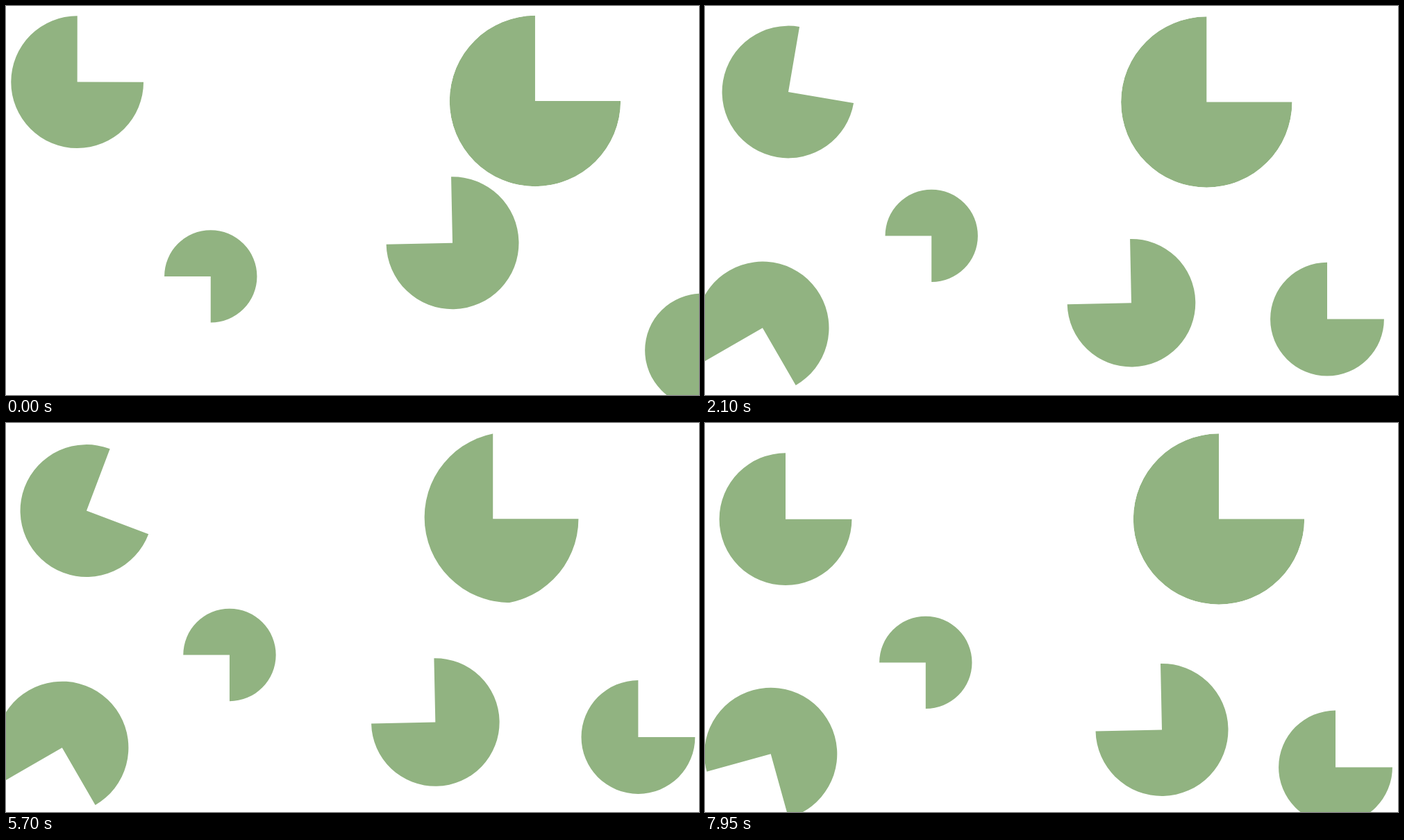
An HTML page for the animation above (8 s loop, 998 px wide and 561 px high).

```html
<!DOCTYPE html>
<html lang="en">
<head>
<meta charset="utf-8">
<title>Drifting pies</title>
<style>
html, body { margin: 0; width: 100%; height: 100%; overflow: hidden; background: #fff; }
svg { display: block; width: 100%; height: 100%; }
</style>
</head>
<body>
<svg viewBox="0 0 998 561" fill="#91b381">
  <defs><clipPath id="lens"><circle r="123.2"/></clipPath></defs>
</svg>
<script>
const LOOP = 8000;
const svg = document.querySelector('svg');
const lens = document.querySelector('#lens circle');

// rest is [x, y, radius, start angle of the missing quarter];
// every other pose is an offset from rest, with missing entries zero
const pies = [
  { rest: [120, 124, 95.4, -80.3], start: [-17.5, -14.5, 0, -6.8], early: [0, 0, 0, -2.9],
    out: [-4, 2.5, 0, 10.9], home: [-4, 14.7, 0, -9.7], enter: [127.3, -46.4] },
  { rest: [707.3, 138.5, 123.2, -90], start: [64, -1.5],
    out: [6, -0.3], home: [32.7, 0], enter: [99.4, -54.9], sway: 15 },
  { rest: [326.2, 331.4, 66.7, 90], start: [-31.7, 59],
    out: [-4.2, 3], home: [-8.4, 14], enter: [-135.4, 86.6, 4.8, -4.8] },
  { rest: [614, 428.2, 92.3, 178.8], start: [29.3, -87.2, 7.5], early: [0, 0, -4.3],
    out: [4.3, 3.3], home: [44, 14.2, 3.2], enter: [70.3, 64.6] },
  { rest: [896, 451.6, 81.9, -90], start: [150.9, 45.4], early: [-43.6],
    out: [14.3, 1.4], home: [12, 44.9], enter: [60.2, -6.5] },
  { rest: [82.9, 464.2, 95.6, 60], start: [-153, 0, 0, -25], early: [-65, 6.8, 27.4, -65],
    out: [-2.1, 4], home: [11.8, 13.1, 0, 14.5], enter: [-25.7, 78.3, -4.6, -9.5] }
];
const big = pies[1];

function add(tag) {
  const el = document.createElementNS('http://www.w3.org/2000/svg', tag);
  svg.appendChild(el);
  return el;
}
for (const pie of pies) pie.el = add('path');
big.el.setAttribute('clip-path', 'url(#lens)');
const discs = [add('circle'), add('circle')];

const progress = (t, from, to) => Math.min(1, Math.max(0, (t - from) / (to - from)));
const smooth = u => u * u * (3 - 2 * u);
const shift = (pose, by = [], k) => pose.map((v, i) => v + k * (by[i] || 0));

function poseAt(pie, t) {
  if (t >= 7100) {
    const far = ((1 - progress(t, 7100, 7900)) / 0.6875) ** 4;
    return shift(shift(pie.rest, pie.home, 1), pie.enter, far);
  }
  let pose = shift(pie.rest, pie.start, Math.exp(-t / 120));
  pose = shift(pose, pie.early, 1 - smooth(progress(t, 650, 2050)));
  pose = shift(pose, pie.out, (Math.max(0, t - 5150) / 550) ** 5);
  return shift(pose, [pie.sway], Math.sin(2 * Math.PI * (t - 600) / 6000));
}

function sector([x, y, r, a]) {
  const at = deg => {
    const q = deg * Math.PI / 180;
    return (x + r * Math.cos(q)).toFixed(2) + ' ' + (y + r * Math.sin(q)).toFixed(2);
  };
  return `M${x} ${y}L${at(a + 90)}A${r} ${r} 0 1 1 ${at(a)}Z`;
}

function circle(el, x, y) {
  el.setAttribute('cx', x);
  el.setAttribute('cy', y);
}

function draw(t) {
  const empty = t >= 6500 && t < 7100;
  for (const pie of pies) {
    let pose = poseAt(pie, t);
    if (pie === big) {
      // the big pie jumps aside for a while, then comes back partly covered
      if (t >= 3450 && t < 5500) pose = [931, 228, 123.2, 173.4];
      const cover = Math.sin(Math.PI * progress(t, 5500, 5900)) ** 2;
      circle(lens, pose[0] + 24.6 * cover, pose[1] - 2.2 * cover);
    }
    pie.el.setAttribute('d', empty ? '' : sector(pose));
  }
  // two full discs peek in from the left and bottom edges
  const u = (t - 7350) / 250;
  const away = 110 * u * u;
  discs.forEach(el => el.setAttribute('r', Math.abs(u) < 1 ? 95.3 : 0));
  circle(discs[0], -0.5 - away, 212);
  circle(discs[1], 454, 637.5 + away);
}

function tick(now) {
  draw(now % LOOP);
  requestAnimationFrame(tick);
}
draw(0);
requestAnimationFrame(tick);
</script>
</body>
</html>
```
